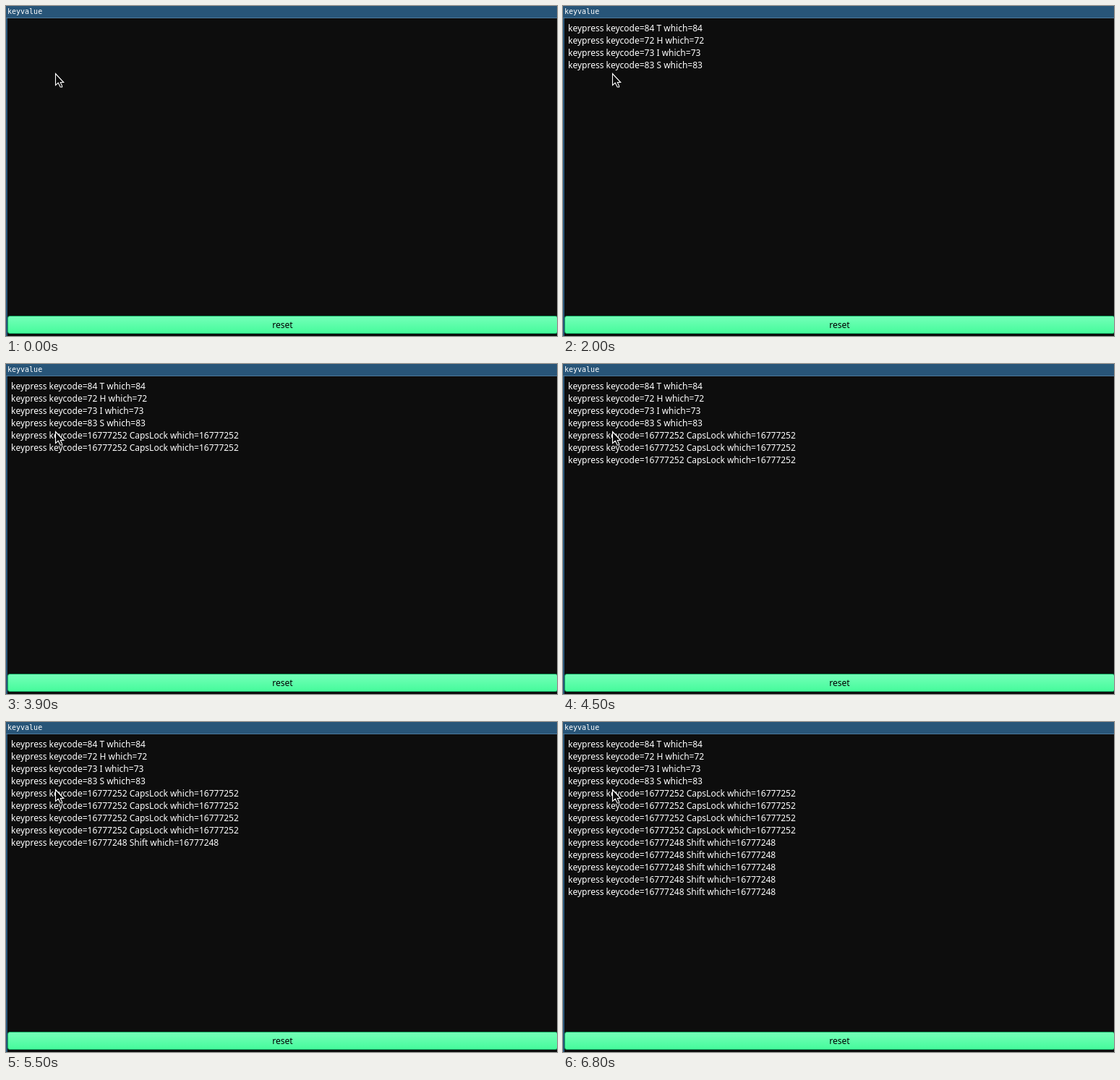
An HTML page for the animation above (8 s loop, 762 px wide and 456 px high).

```html
<!DOCTYPE html>
<html lang="en">
<head>
<meta charset="utf-8">
<title>keyvalue</title>
<style>
  html, body { margin: 0; width: 100%; height: 100%; overflow: hidden; background: #0d0d0d; }
  #stage { position: relative; width: 762px; height: 456px; overflow: hidden;
    background: #0d0d0d; color: #fff; font: 12px/17px "Noto Sans", sans-serif; }
  #stage > * { position: absolute; box-sizing: border-box; white-space: pre; }
  #edge { left: 0; top: 0; width: 2px; height: 456px; background: #285578; }
  #bar { left: 0; top: 0; width: 762px; height: 17px; padding-left: 2px;
    background: #285578; border-bottom: 1px solid #4c7899;
    font: 10px/15px "DejaVu Sans Mono", monospace; }
  #log { left: 7px; top: 22px; }
  #reset { left: 2px; top: 428px; width: 761px; height: 25px; border: 1px solid #12a05c;
    border-radius: 3px; background: linear-gradient(#74ffb8, #46fb9c);
    color: #000; text-align: center; line-height: 23px; }
  #pointer { left: 66px; top: 91px; }
</style>
</head>
<body>
<div id="stage">
  <div id="edge"></div>
  <div id="bar">keyvalue</div>
  <div id="log"></div>
  <div id="reset">reset</div>
  <svg id="pointer" width="18" height="24">
    <path d="M2.5 2.5V18.5L6.2 15.2L9.2 21H11.6V19.5L9.3 14.5H13.7Z" fill="#0a0a0a" stroke="#fff" stroke-width="1.1"/>
  </svg>
</div>
<script>
  const LOOP = 8000;
  const CAPS = [16777252, "CapsLock"], SHIFT = [16777248, "Shift"];
  const presses = [
    [500, 84, "T"], [1200, 72, "H"], [1700, 73, "I"], [2000, 83, "S"],
    ...[3300, 3900, 4500, 5000].map(at => [at, ...CAPS]),
    ...[5500, 5800, 6200, 6500, 6800].map(at => [at, ...SHIFT])
  ];
  const log = document.getElementById("log");
  const lines = presses.map(([at, code, key]) => {
    const el = document.createElement("div");
    el.textContent = `keypress keycode=${code} ${key} which=${code}`;
    log.append(el);
    return { at, el };
  });

  const start = performance.now();
  function draw(now) {
    const t = Math.max(0, now - start) % LOOP;
    for (const { at, el } of lines) el.style.visibility = t >= at ? "visible" : "hidden";
    requestAnimationFrame(draw);
  }
  draw(start);
</script>
</body>
</html>
```
